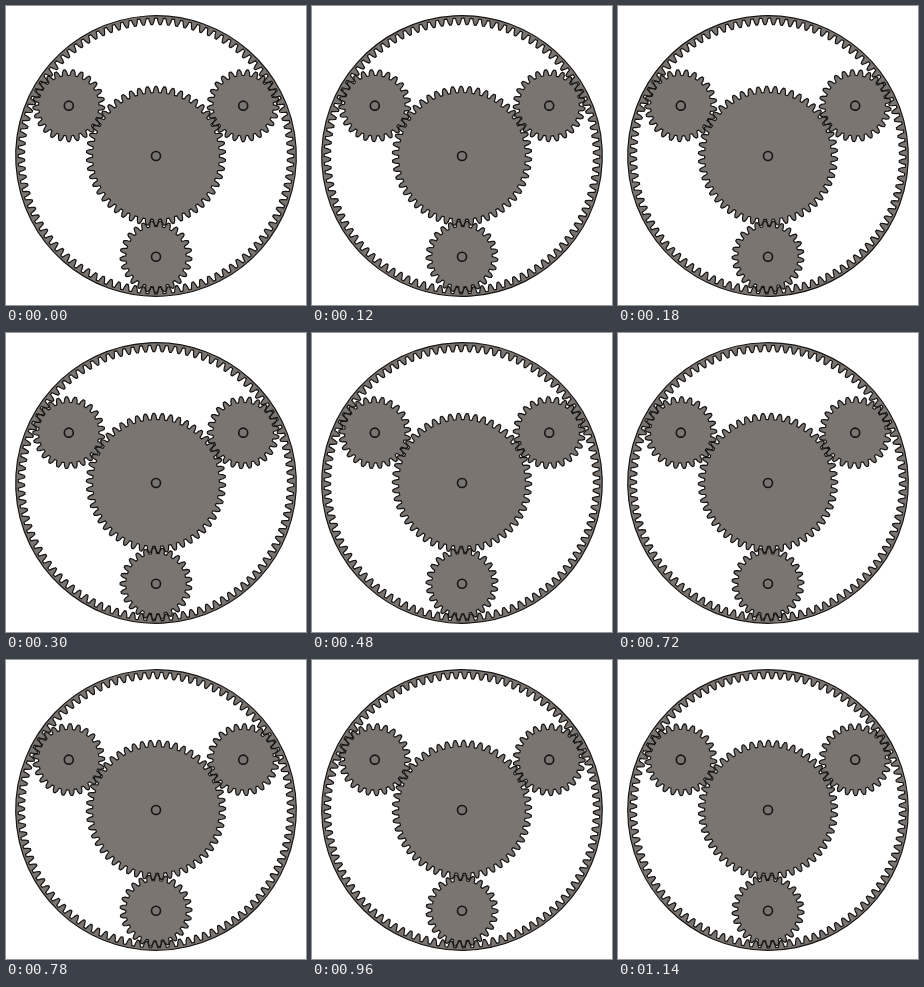
These frames come from a looping animation (300 px wide and 299 px high, 1.2 s). An HTML page:

```html
<!DOCTYPE html>
<html lang="en">
<head>
<meta charset="utf-8">
<title>Planetary gear</title>
<style>
  html, body { margin: 0; width: 100%; height: 100%; overflow: hidden; background: #fff; }
  svg { display: block; width: 100vw; height: 100vh; }
  path, circle { fill: #7a7571; stroke: #161414; stroke-width: 1.2; stroke-linejoin: round; }
  .hub { stroke-width: 1.6; }
</style>
</head>
<body>
<svg id="stage" viewBox="0 0 300 299"></svg>
<script>
const TAU = Math.PI * 2;
const LOOP = 1200, STEP = 60;
const CENTER = [150, 150], ARM = 100.7;
const SUN = 50, PLANET = 25, RING = 100;
const stage = document.getElementById('stage');

function add(parent, name, attrs) {
  const el = document.createElementNS('http://www.w3.org/2000/svg', name);
  for (const key in attrs) el.setAttribute(key, attrs[key]);
  return parent.appendChild(el);
}

// Closed outline with one tooth centred on angle 0.
function toothPath(count, root, pitch, tip) {
  const profile = [[root, -.35], [pitch, -.25], [tip, -.1], [tip, .1], [pitch, .25], [root, .35]];
  const points = [];
  for (let k = 0; k < count; k++) {
    for (const [r, offset] of profile) {
      const a = (k + offset) * TAU / count;
      points.push((r * Math.cos(a)).toFixed(2) + ' ' + (r * Math.sin(a)).toFixed(2));
    }
  }
  return 'M' + points.join('L') + 'Z';
}

function makeGear(x, y, d, hub) {
  const group = add(stage, 'g', { transform: `translate(${x} ${y})` });
  const body = add(group, 'path', { d, 'fill-rule': 'evenodd' });
  if (hub) add(group, 'circle', { r: 4.5, class: 'hub' });
  return body;
}

const rim = 'M140.3 0A140.3 140.3 0 1 1 -140.3 0A140.3 140.3 0 1 1 140.3 0Z';
const ring = makeGear(...CENTER, rim + toothPath(RING, 137.8, 134.3, 131.4), false);
const sun = makeGear(...CENTER, toothPath(SUN, 63.4, 67.1, 69.6), true);
const planets = [90, 210, 330].map(deg => {
  const phi = deg * TAU / 360;
  const x = CENTER[0] + ARM * Math.cos(phi);
  const y = CENTER[1] + ARM * Math.sin(phi);
  return { phi, body: makeGear(x, y, toothPath(PLANET, 30.2, 33.6, 35.9), true) };
});

function turn(el, angle) {
  el.setAttribute('transform', `rotate(${angle * 360 / TAU})`);
}

// Planet angle that puts a gap against the sun's tooth.
function planetAngle(phi, sunAngle) {
  const phase = (phi - sunAngle) * SUN / TAU;
  return phi + Math.PI - (.5 - phase) * TAU / PLANET;
}

// The sun turns back by one tooth per loop; the other gears follow.
function draw(time) {
  const progress = Math.floor((time % LOOP) / STEP) * STEP / LOOP;
  const sunAngle = -TAU / 4 - progress * TAU / SUN;
  turn(sun, sunAngle);
  for (const { phi, body } of planets) turn(body, planetAngle(phi, sunAngle));

  const phi = planets[0].phi;
  const phase = (phi - planetAngle(phi, sunAngle)) * PLANET / TAU;
  turn(ring, phi - (.5 + phase) * TAU / RING);
}

const start = performance.now();
function tick() {
  draw(performance.now() - start);
  requestAnimationFrame(tick);
}
tick();
</script>
</body>
</html>
```
